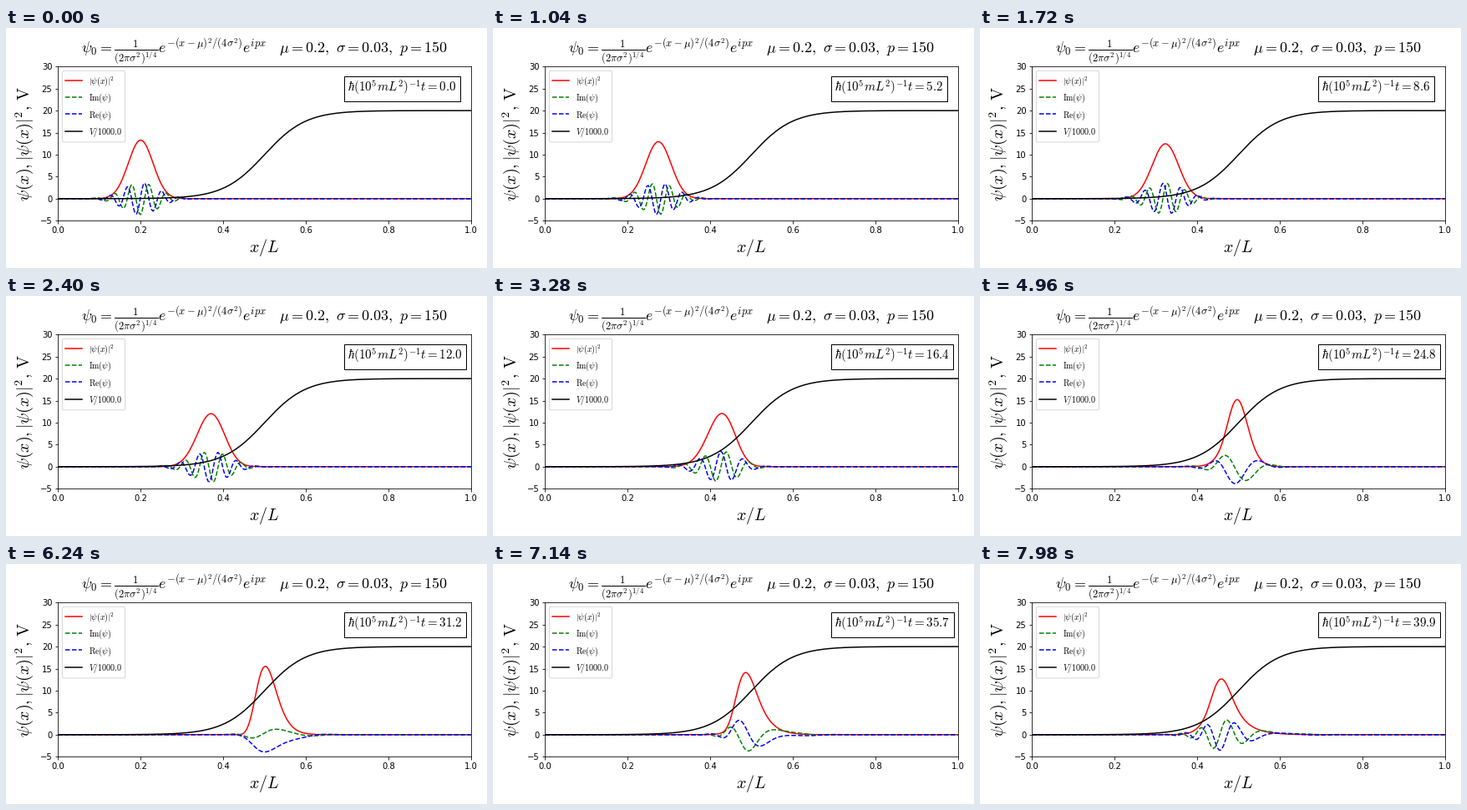
A matplotlib script that plays this animation: 576 px wide and 288 px high, repeating every 8 s.

```python
import numpy as np
import matplotlib.pyplot as plt
from matplotlib.animation import FuncAnimation
from matplotlib.lines import Line2D
from matplotlib.patches import FancyBboxPatch, Rectangle
from matplotlib.transforms import Affine2D

W, H, DPI = 576, 288, 72
FRAMES, INTERVAL = 400, 20
MU, SIGMA, P = 0.2, 0.03, 150
DT = 1e-5  # evolution time per frame, in mL^2/hbar

plt.rcParams["font.family"] = "DejaVu Sans"
plt.rcParams["mathtext.fontset"] = "cm"

# Finite-difference Hamiltonian on a unit interval with hard walls
N = 301
x = np.linspace(0, 1, N)
dx = x[1] - x[0]
V = 2e4 / (1 + np.exp(-(x - 0.5) / 0.05))
hop = np.full(N - 3, -0.5 / dx**2)
ham = np.diag(1 / dx**2 + V[1:-1]) + np.diag(hop, 1) + np.diag(hop, -1)
energy, modes = np.linalg.eigh(ham)

psi0 = np.exp(-(x - MU) ** 2 / (4 * SIGMA**2) + 1j * P * x)
psi0 /= (2 * np.pi * SIGMA**2) ** 0.25
coef = modes.T @ psi0[1:-1]


def wave(t):
    psi = np.zeros(N, complex)
    psi[1:-1] = modes @ (coef * np.exp(-1j * energy * t))
    return psi


fig = plt.figure(figsize=(W / DPI, H / DPI), dpi=DPI, facecolor="white")
# Pixel coordinates with the origin at the top left
px = Affine2D().scale(1 / W, -1 / H).translate(0, 1) + fig.transFigure


def label(px_x, px_y, s, size, **kw):
    return fig.text(px_x, px_y, s, fontsize=size, transform=px,
                    va="baseline", **kw)


left, right, top, bottom = 62.4, 556.8, 46.25, 231.25
ax = fig.add_axes([left / W, 1 - bottom / H,
                   (right - left) / W, (bottom - top) / H])
ax.set_xlim(0, 1)
ax.set_ylim(-5, 30)
ax.set_yticks(range(-5, 31, 5))

STYLES = [
    ("r", "-", r"$|\psi(x)|^2$"),
    ("g", "--", r"$\mathrm{Im}(\psi)$"),
    ("b", "--", r"$\mathrm{Re}(\psi)$"),
    ("k", "-", r"$V/1000.0$"),
]
prob, imag, real, pot = [
    ax.plot(x, V / 1000, color=c, ls=ls, lw=1.5)[0] for c, ls, _ in STYLES
]

ax.set_title(r"$\psi_0=\frac{1}{(2\pi\sigma^2)^{1/4}}"
             r"e^{-(x-\mu)^2/(4\sigma^2)}e^{ipx}\quad"
             r"\mu=0.2,\ \sigma=0.03,\ p=150$", fontsize=18)
label((left + right) / 2, 269, r"$x/L$", 20, ha="center")
label(28, (top + bottom) / 2, r"$\psi(x), |\psi(x)|^2,\,\mathrm{V}$", 20,
      ha="center", rotation=90, rotation_mode="anchor")

# Legend
fig.add_artist(FancyBboxPatch(
    (67.4, 51.3), 75.2, 85.6, boxstyle="round,pad=0,rounding_size=2",
    fc="white", ec="0.8", lw=1, alpha=0.8, transform=px))
for i, (c, ls, name) in enumerate(STYLES):
    y = 62.6 + 20.4 * i
    fig.add_artist(Line2D([71.4, 91.4], [y, y], color=c, ls=ls, lw=1.5,
                          transform=px))
    label(99.4, y + 4.3, name, 10)

# Clock, framed by a box that follows the width of its text
BOX_X, PAD = 405.4, 4
box = fig.add_artist(Rectangle((BOX_X, 58.4), 138, 29.6, fc="white", ec="k",
                               lw=1, transform=px))
clock = label(BOX_X + PAD, 77, "", 15)


def update(k):
    psi = wave(k * DT)
    prob.set_ydata(np.abs(psi) ** 2)
    imag.set_ydata(psi.imag)
    real.set_ydata(psi.real)
    clock.set_text(rf"$\hbar(10^5mL^2)^{{-1}}t={k / 10:.1f}$")
    end = clock.get_window_extent().x1 * W / fig.bbox.width
    box.set_width(end + PAD - BOX_X)
    return prob, imag, real, box, clock


anim = FuncAnimation(fig, update, frames=FRAMES, interval=INTERVAL,
                     init_func=lambda: update(0), repeat=True,
                     repeat_delay=0, blit=False)
plt.show()
```
